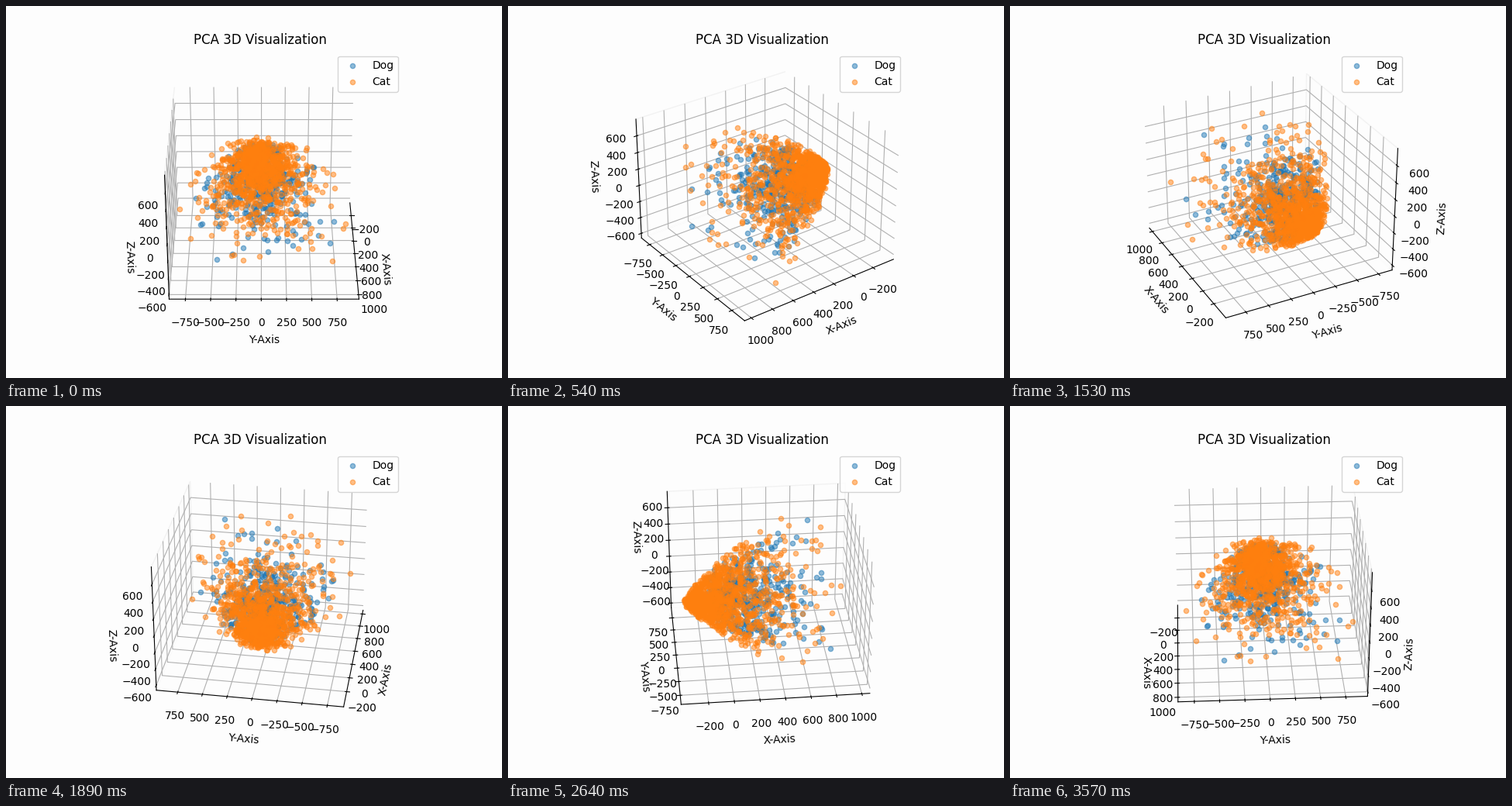
A matplotlib script for the animation above (3.6 s loop, 640x480 px).

```python
import numpy as np
import matplotlib.pyplot as plt
from matplotlib.animation import FuncAnimation

FRAMES = 120
STEP_MS = 30
BACK = "#fdfdfd"

# Axis limits, and the drawn size of the 4:4:3 box
LOW = np.array([-413, -911, -660])
HIGH = np.array([1063, 967, 797])
BOX = np.array([1.1905, 1.1905, 0.8929])

# Tip of the cloud and its drift per unit of depth, in box units
APEX = np.array([-0.537, -0.054, -0.025])
DRIFT = np.array([1.0, 0.1, 0.0])

rng = np.random.default_rng(12)


def to_data(points):
    return (LOW + HIGH) / 2 + points / BOX * (HIGH - LOW)


def cone(depth, width, power):
    """Points in a blunt cone along x; a higher power crowds its middle."""
    n = len(depth)
    radius = width * depth ** 0.75 * rng.random(n) ** power
    angle = rng.uniform(0, 2 * np.pi, n)
    ring = np.column_stack([np.zeros(n), np.cos(angle), np.sin(angle)])
    points = APEX + depth[:, None] * DRIFT + radius[:, None] * ring
    inside = np.all(np.abs(points) < (0.54, 0.5, 0.39), axis=1)
    return points[inside & (points[:, 0] < 0.4)]


dogs = cone(0.13 + rng.gamma(3, 0.1, 420), 0.6, 0.7)
cats = cone(rng.gamma(2, 0.14, 1050), 0.7, 0.6)
strays = [(0.27, -0.53, 0.02), (0.4, 0.51, -0.01), (0.15, 0.51, -0.2),
          (0.52, 0.21, -0.12), (0.33, -0.12, 0.38)]
cats = np.vstack([cats, strays])

fig = plt.figure(figsize=(6.4, 4.8), dpi=100, facecolor=BACK)
ax = fig.add_subplot(projection="3d", computed_zorder=False)
ax.set_facecolor(BACK)

for points, name in ((dogs, "Dog"), (cats, "Cat")):
    ax.scatter(*to_data(points).T, alpha=0.5, label=name, depthshade=False)

# Only the y pane keeps a faint outline
for axis in (ax.xaxis, ax.yaxis, ax.zaxis):
    axis.pane.set_alpha(None)
    axis.pane.set_fill(False)
    axis.pane.set_edgecolor("#f2f2f2" if axis is ax.yaxis else BACK)

ax.set_xticks(range(-200, 1001, 200))
ax.set_yticks(range(-750, 751, 250))
ax.set_zticks(range(-600, 601, 200))
for letter, low, high in zip("xyz", LOW, HIGH):
    ax.set(**{f"{letter}lim": (low, high),
              f"{letter}label": f"{letter.upper()}-Axis"})
ax.set_title("PCA 3D Visualization")
ax.legend(loc="upper right")


def update(i):
    # The tiny offset settles which side the axes take when seen edge-on
    ax.view_init(elev=30, azim=i * 360 / FRAMES + 1e-3)
    return []


anim = FuncAnimation(fig, update, frames=FRAMES, interval=STEP_MS,
                     repeat=True, repeat_delay=0)
plt.show()
```
